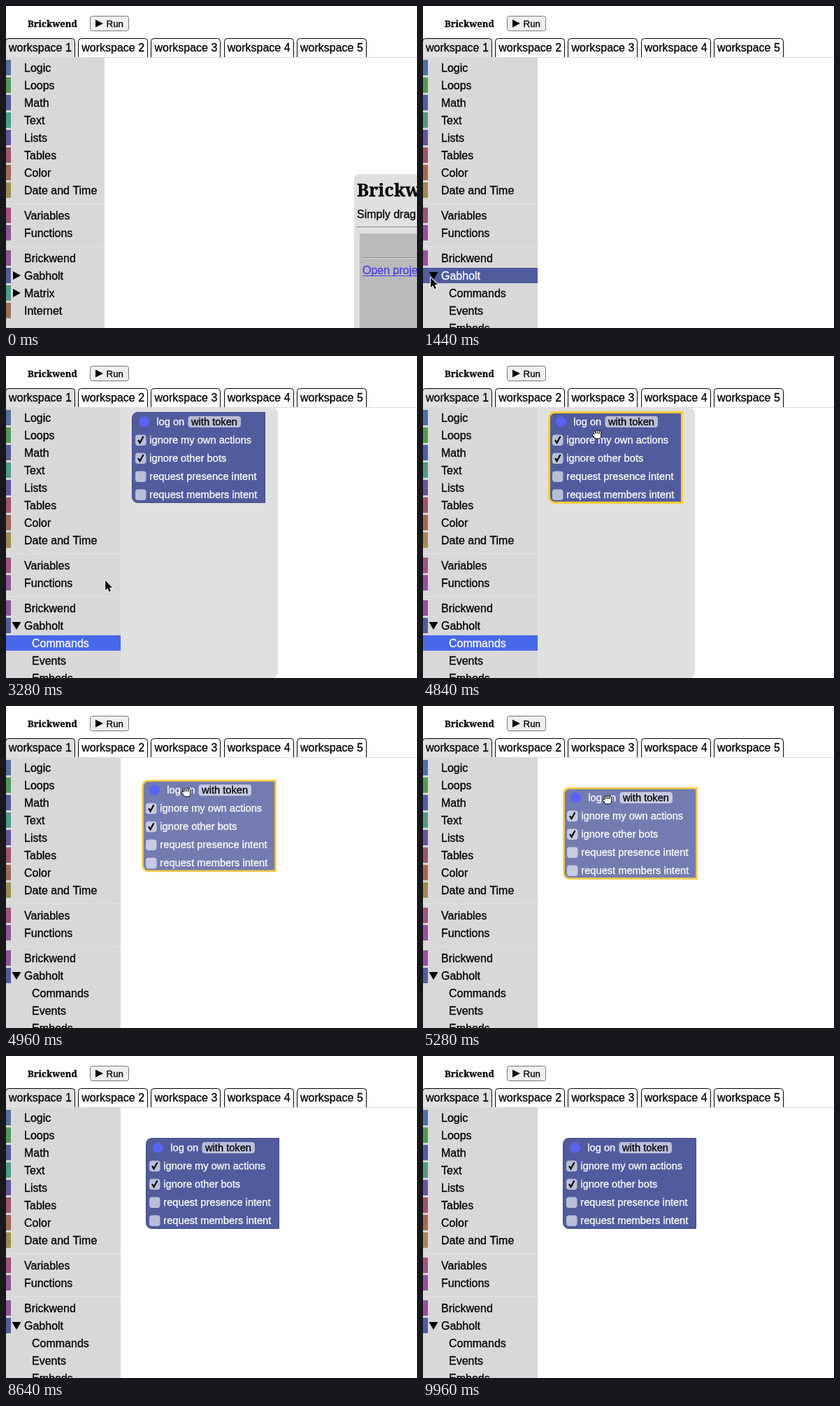
Animation, 588 px wide and 460 px high, one loop 10000 ms. Source, as an HTML page with a canvas:

```html
<!DOCTYPE html>
<html lang="en">
<head>
<meta charset="utf-8">
<style>
  html, body { margin: 0; width: 100%; height: 100%; overflow: hidden; background: #fff; }
  canvas { display: block; }
</style>
</head>
<body>
<canvas id="stage" width="588" height="460"></canvas>
<script>
const ctx = document.getElementById('stage').getContext('2d');
const SANS = '"Liberation Sans", Arial, sans-serif';
const SERIF = '"Noto Serif", serif';
const FIELD = 'rgba(255, 255, 255, .6)';
const LOOP = 10000;
const EXPAND = 880, OPEN = 2440, PRESS = 4640, DRAG = 4860, DROP = 5480, GONE = 6480, DESELECT = 7480;

// label, row centre, stripe colour
const categories = [
  ['Logic', 88, '#4f6fa0'], ['Loops', 113, '#509a52'], ['Math', 138, '#515c9e'],
  ['Text', 163, '#4f9c86'], ['Lists', 188, '#66529c'], ['Tables', 213, '#a0526b'],
  ['Color', 238, '#a06a4f'], ['Date and Time', 263, '#a08b4f'],
  ['Variables', 299, '#a05278'], ['Functions', 324, '#90529c'],
  ['Brickwend', 360, '#90529c'], ['Gabholt', 385, '#515c9e']
];
const collapsed = [['Matrix', 410, '#4f9c86'], ['Internet', 435, '#a0724f']];
const children = [['Commands', 410], ['Events', 435], ['Embeds', 460]];

// pointer path: time, x, y
const path = [
  [280, 62, 470], [480, 10, 391], [680, 10, 391], [720, 11, 388], [1920, 11, 388],
  [2320, 75, 409], [2840, 75, 409], [3280, 142, 321], [3880, 243, 105], [4200, 243, 97],
  [4780, 243, 97], [4840, 249, 112], [4880, 254, 116], [5080, 264, 134], [5560, 264, 134],
  [5920, 268, 256], [6200, 272, 268]
];

function pointer(t) {
  const i = path.findIndex(p => p[0] > t);
  if (i < 0) return path[path.length - 1].slice(1);
  if (i === 0) return path[0].slice(1);
  const [t0, x0, y0] = path[i - 1], [t1, x1, y1] = path[i];
  const k = (t - t0) / (t1 - t0);
  return [x0 + (x1 - x0) * k, y0 + (y1 - y0) * k];
}

function rect(x, y, w, h, fill, radii = 0, stroke, line = 1) {
  ctx.beginPath();
  ctx.roundRect(x, y, w, h, radii);
  if (fill) { ctx.fillStyle = fill; ctx.fill(); }
  if (stroke) { ctx.strokeStyle = stroke; ctx.lineWidth = line; ctx.stroke(); }
}

// a hairline outline gives the slightly heavy letters
function text(str, x, y, size = 16, color = '#000', font = SANS, weight = '') {
  ctx.font = `${weight} ${size}px ${font}`;
  ctx.fillStyle = ctx.strokeStyle = color;
  ctx.lineWidth = .3;
  ctx.fillText(str, x, y);
  ctx.strokeText(str, x, y);
}

function poly(points, fill, stroke) {
  ctx.beginPath();
  points.forEach(([x, y]) => ctx.lineTo(x, y));
  ctx.closePath();
  if (stroke) { ctx.strokeStyle = stroke; ctx.lineWidth = 2; ctx.stroke(); }
  ctx.fillStyle = fill;
  ctx.fill();
}

const arrowRight = (x, y) => poly([[x, y - 6], [x + 11, y], [x, y + 6]], '#000');

function header() {
  text('Brickwend', 31, 30, 13, '#000', SERIF, 'bold');
  rect(120.5, 14.5, 55, 21, '#efefef', 3, '#767676');
  poly([[128, 19.5], [139, 25], [128, 30.5]], '#000');
  text('Run', 143.5, 30, 13.33);
  rect(0, 73, 588, 1, '#dcdcdc');
  for (let i = 0; i < 5; i++) {
    const x = Math.round(104.25 * i - 1.1);
    ctx.save();
    ctx.beginPath();
    ctx.rect(0, 40, 588, 33);
    ctx.clip();
    rect(x + .5, 46.5, 99, 40, i ? '#fff' : '#e0e0e0', 4, '#000');
    ctx.restore();
    text('workspace ' + (i + 1), 104.25 * i + 4, 65);
  }
}

function welcome() {
  rect(498, 240, 120, 260, '#e0e0e0', 8);
  text('Brickwend', 502, 272, 25.5, '#000', SERIF, 'bold');
  text('Simply drag blocks', 502, 303);
  rect(502, 315, 100, 1, '#8c8c8c');
  rect(506, 325, 100, 140, '#bababa');
  rect(510, 359, 90, 1, '#858585');
  rect(510, 360, 90, 1, '#dedede');
  text('Open project', 510, 383, 16, '#4b40e0');
  rect(510, 385, 90, 1, '#4b40e0');
}

function sidebar(t) {
  const open = t >= EXPAND, width = open ? 164 : 141;
  rect(0, 74, width, 386, '#d8d8d8');
  for (const y of [282, 343]) rect(0, y, width, 1, '#e2e2e2');
  for (const [label, y, color] of open ? categories : categories.concat(collapsed)) {
    const selected = label === 'Gabholt' && open && t < OPEN;
    rect(0, y - 11, selected ? width : 7, 22, color);
    text(label, 26, y + 6, 16, selected ? '#fff' : '#000');
  }
  if (!open) {
    arrowRight(10, 385);
    arrowRight(10, 410);
    return;
  }
  poly([[8.5, 380], [21.5, 380], [15, 391]], '#000');
  for (const [label, y] of children) {
    const selected = label === 'Commands' && t >= OPEN && t < DRAG;
    if (selected) rect(0, y - 11, width, 22, '#4868ea');
    text(label, 37, y + 6, 16, selected ? '#fff' : '#000');
  }
}

function block(x, y, selected, alpha) {
  ctx.save();
  ctx.translate(x, y);
  ctx.globalAlpha = alpha;
  rect(.5, -.5, 190, 129, '#515c9e', [8, 0, 0, 8], selected ? '#fc3' : '#414a80', selected ? 3 : 1);
  ctx.globalAlpha = 1;
  ctx.beginPath();
  ctx.arc(17.5, 13, 7.5, 0, 7);
  ctx.fillStyle = '#5865f2';
  ctx.fill();
  text('log on', 35.3, 18, 14.67, '#fff');
  rect(80.5, 5, 75.5, 16, FIELD, 4);
  text('with token', 85, 18, 14.67);
  ['ignore my own actions', 'ignore other bots', 'request presence intent', 'request members intent']
    .forEach((label, i) => {
      const cy = 39 + 26 * i;
      rect(5, cy - 7.5, 15.5, 15.5, FIELD, 4);
      text(label, 25.3, cy + 5, 14.67, '#fff');
      if (i > 1) return;
      ctx.beginPath();
      ctx.moveTo(9, cy);
      ctx.lineTo(11.5, cy + 4);
      ctx.lineTo(16.5, cy - 5);
      ctx.strokeStyle = '#000';
      ctx.lineWidth = 2.2;
      ctx.stroke();
    });
  ctx.restore();
}

function cursor(x, y, hand) {
  ctx.save();
  ctx.translate(x, y);
  ctx.lineJoin = 'round';
  if (hand) {
    rect(-4.5, -2, 10, 8, '#fff', 3, '#000');
    for (let i = 0; i < 4; i++) rect(-4.5 + 2.5 * i, i % 3 ? -6 : -5, 2.5, 6, '#fff', 1.2, '#000');
    rect(-6.5, -1, 3, 4, '#fff', 1.5, '#000');
    rect(-4, -1, 9, 6, '#fff', 2);
  } else {
    poly([[0, 0], [0, 14], [3.2, 11], [5.5, 16.2], [7.8, 15.2], [5.6, 10.2], [10, 10]], '#000', '#fff');
  }
  ctx.restore();
}

function draw(t) {
  rect(0, 0, 588, 460, '#fff');
  header();
  if (t < EXPAND) welcome();
  const [x, y] = pointer(t);
  if (t >= OPEN && t < DRAG) rect(164, 74, 225, 386, '#e0e0e0', [0, 8, 8, 0]);
  sidebar(t);
  if (t >= OPEN) {
    const selected = t >= PRESS && t < DESELECT;
    if (t < DRAG) block(180, 81, selected, 1);
    else if (t < DROP) block(180 + x - 243, 81 + y - 97, selected, .8);
    else block(200, 118, selected, 1);
  }
  if (t < GONE) cursor(x, y, t > 3740 && t < 5880);
}

function tick() {
  draw(performance.now() % LOOP);
  requestAnimationFrame(tick);
}
tick();
</script>
</body>
</html>
```
